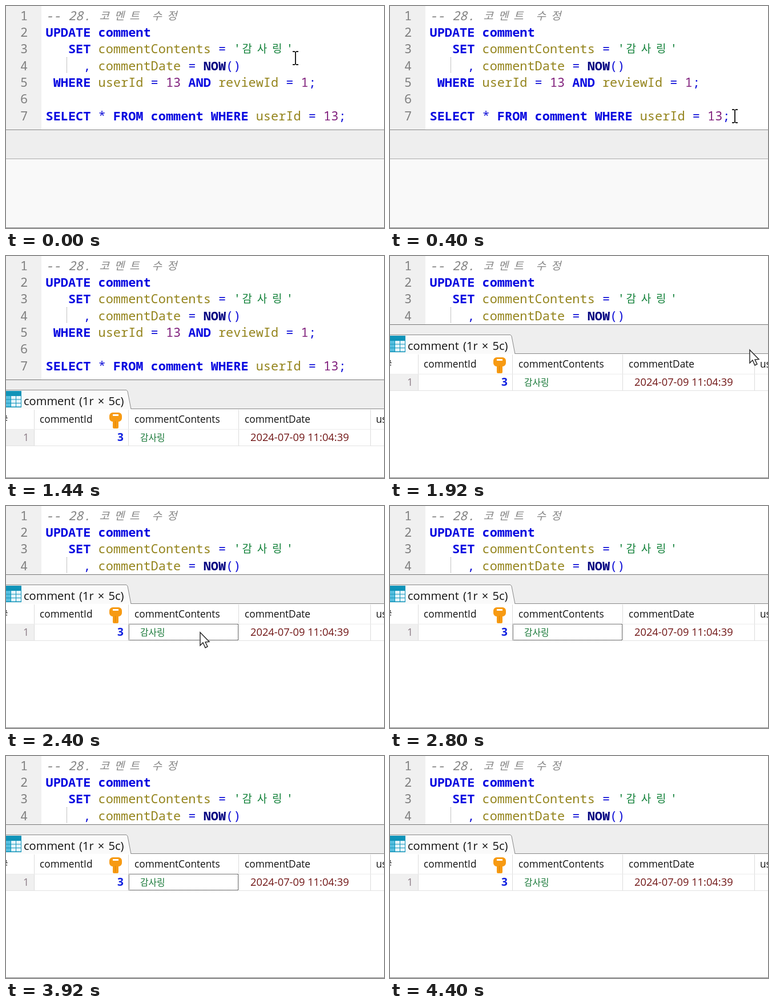
Animation, 662 px wide and 390 px high, one loop 4480 ms. Source, as an HTML page with a canvas:

```html
<!DOCTYPE html>
<html lang="ko">
<head>
<meta charset="utf-8">
<style>
html, body { margin: 0; width: 100%; height: 100%; overflow: hidden; background: #fff }
canvas { display: block }
</style>
</head>
<body>
<canvas id="stage" width="662" height="390"></canvas>
<script>
const ctx = document.getElementById('stage').getContext('2d');
const LOOP = 4480, STEP = 80;
const MONO = '"Noto Sans Mono", "Noto Sans CJK KR", "Noto Sans CJK", monospace';
const SANS = '"Open Sans", "Noto Sans", "Noto Sans CJK KR", "Noto Sans CJK", sans-serif';
const COL = 13.15, ROW = 29.3, LEFT = 69.5;
const CODE = [
  '-- 28. 코멘트 수정',
  'UPDATE comment',
  "   SET commentContents = '감사링'",
  '     , commentDate = NOW()',
  ' WHERE userId = 13 AND reviewId = 1;',
  '',
  'SELECT * FROM comment WHERE userId = 13;'
];
const isWide = ch => ch >= '가' && ch <= '힣';

function rect(x, y, w, h, color) {
  ctx.fillStyle = color;
  ctx.fillRect(x, y, w, h);
}

function text(str, x, y, font, color) {
  ctx.font = font;
  ctx.fillStyle = color;
  ctx.fillText(str, x, y);
}

function poly(points, fill, stroke, close = true) {
  ctx.beginPath();
  points.forEach(([x, y]) => ctx.lineTo(x, y));
  if (close) ctx.closePath();
  if (fill) { ctx.fillStyle = fill; ctx.fill(); }
  if (stroke) { ctx.strokeStyle = stroke; ctx.stroke(); }
}

// [style, colour] of a code token
function tokenStyle(token) {
  if (token.startsWith('--')) return ['italic', '#858585'];
  if (token[0] === "'") return ['500', '#108038'];
  if (token === 'NOW') return ['bold', '#000080'];
  if (token === 'comment' || /^[A-Z]+$/.test(token)) return ['bold', '#0808e0'];
  if (/^\d/.test(token)) return ['500', '#80207c'];
  if (/^\w/.test(token)) return ['500', '#94841c'];
  return ['500', '#1010d8'];
}

function codeLine(line, i) {
  const y = 24.7 + i * ROW;
  let col = 0;
  text(i + 1, 25, y, '500 21.9px ' + MONO, '#808080');
  for (const token of line.match(/\s+|--.*|'.*'|\w+|[^\s\w]+/g) || []) {
    const [style, color] = tokenStyle(token);
    for (const ch of token) {
      const wide = isWide(ch);
      text(ch, LEFT + col * COL + (wide ? 2 : 0), y - (wide ? 1 : 0),
        `${style} ${wide ? 19 : 21.9}px ${MONO}`, color);
      col += wide ? 2 : 1;
    }
  }
}

function editor() {
  rect(0, 0, 662, 390, '#fff');
  rect(0, 0, 62, 218, '#f0f0f0');
  CODE.forEach(codeLine);
  for (let y = 90; y < 118; y += 2) rect(106, y, 1, 1, '#888');
}

function tableIcon() {
  rect(0, 237, 27, 29, '#0f93b8');
  for (let r = 0; r < 3; r++)
    for (let c = 0; c < 3; c++)
      rect(c * 9, 246 + r * 6.5, 8, 5.5, c ? '#e4f5fd' : '#58bfe0');
}

function keyIcon() {
  ctx.fillStyle = '#f79a12';
  ctx.beginPath();
  ctx.roundRect(181, 275, 22, 16, 6);
  ctx.roundRect(187, 287, 10, 16, 2);
  ctx.fill();
  rect(187, 278, 10, 3, '#fff');
  rect(191, 290, 1, 11, '#d98408');
}

function emptyPanel() {
  rect(0, 217, 662, 52, '#eee');
  rect(0, 217, 662, 1, '#888');
  rect(0, 268, 662, 1, '#aaa');
  rect(0, 269, 662, 121, '#f9f9f9');
}

function resultPanel(shift, selected) {
  ctx.save();
  ctx.translate(0, shift);
  rect(0, 217, 662, 300, '#fff');
  rect(0, 217, 662, 52, '#eee');
  rect(0, 217, 662, 1, '#777');
  rect(219, 268, 443, 1, '#888');
  ctx.lineWidth = 1;
  poly([[-2, 235.5], [211, 235.5], [213, 238], [219, 269], [-2, 269]], '#fafafa');
  poly([[-2, 235.5], [211, 235.5], [213, 238], [219, 269]], null, '#888', false);
  tableIcon();
  ctx.wordSpacing = '2px';
  text('comment (1r × 5c)', 31, 262, '20.1px ' + SANS, '#111');
  ctx.wordSpacing = '0px';

  rect(0, 304, 49, 29, '#f0f0f0');
  for (const x of [49, 214, 407, 638]) rect(x, 270, 1, 64, '#dcdcdc');
  rect(0, 304, 662, 1, '#ececec');
  rect(0, 333, 662, 1, '#e2e2e2');
  const head = (str, x) => text(str, x, 293, '17.25px ' + SANS, '#111');
  head('#', -8);
  head('commentId', 59);
  head('commentContents', 225);
  head('commentDate', 418);
  head('userId', 648);
  keyIcon();
  text('1', 30, 325, '18px ' + SANS, '#8a7a84');
  text('3', 195, 325, 'bold 19px ' + SANS, '#1020e0');
  text('감사링', 235, 325, '500 15.8px ' + SANS, '#187838');
  text('2024-07-09 11:04:39', 428, 325, '18.3px ' + SANS, '#701414');
  if (selected) {
    ctx.setLineDash([1, 1]);
    ctx.lineDashOffset = 0.5;
    ctx.strokeStyle = '#000';
    ctx.strokeRect(215.5, 304.5, 191, 28);
  }
  ctx.restore();
}

function popupEdge(w, h) {
  rect(w, 0, 1, h, '#d4d4d4');
  rect(0, h, w + 1, 1, '#999');
}

function beam([x, y]) {
  rect(x - 1, y - 11, 2, 23, '#222');
  for (const dy of [-12, 11])
    for (const dx of [-5, 1]) rect(x + dx, y + dy, 4, 2, '#222');
}

function arrow([x, y]) {
  ctx.lineWidth = 1.4;
  poly([[0, 0], [0, 23], [5, 18], [9, 27], [13, 25], [9, 17], [16, 16.5]]
    .map(([dx, dy]) => [x + dx, y + dy]), '#fff', '#222');
}

// Position along [time, x, y] keys
function along(keys, t) {
  const i = keys.findIndex(k => k[0] > t);
  if (i < 1) return null;
  const [t0, x0, y0] = keys[i - 1], [t1, x1, y1] = keys[i];
  const p = (t - t0) / (t1 - t0), e = p * p * (3 - 2 * p);
  return [Math.round(x0 + (x1 - x0) * e), Math.round(y0 + (y1 - y0) * e)];
}

const BEAM = [[0, 507, 91], [80, 507, 91], [400, 604, 193], [560, 604, 193], [720, 560, -20]];
const ARROW = [[1760, 636, 170], [1840, 634, 121], [1920, 630, 165], [2240, 340, 222],
  [2400, 340, 222], [2640, 680, 285]];

function draw(t) {
  editor();
  if ((t >= 560 && t < 1090) || (t >= 1620 && t < 1760)) rect(595, 178, 2, 26, '#000');
  if (t < 1040) emptyPanel();
  else resultPanel(t < 1760 ? 0 : t < 1840 ? -49 : -97, t >= 2320 && t < 4240);
  if (t >= 800 && t < 1040) {
    popupEdge(269, 144);
    popupEdge(342, 180);
  }
  rect(0, 389, 662, 1, '#888');
  const b = along(BEAM, t), a = along(ARROW, t);
  if (b) beam(b);
  if (a) arrow(a);
}

const start = performance.now();
function tick() {
  const t = (performance.now() - start) % LOOP;
  draw(Math.floor(t / STEP) * STEP);
  requestAnimationFrame(tick);
}
tick();
</script>
</body>
</html>
```
